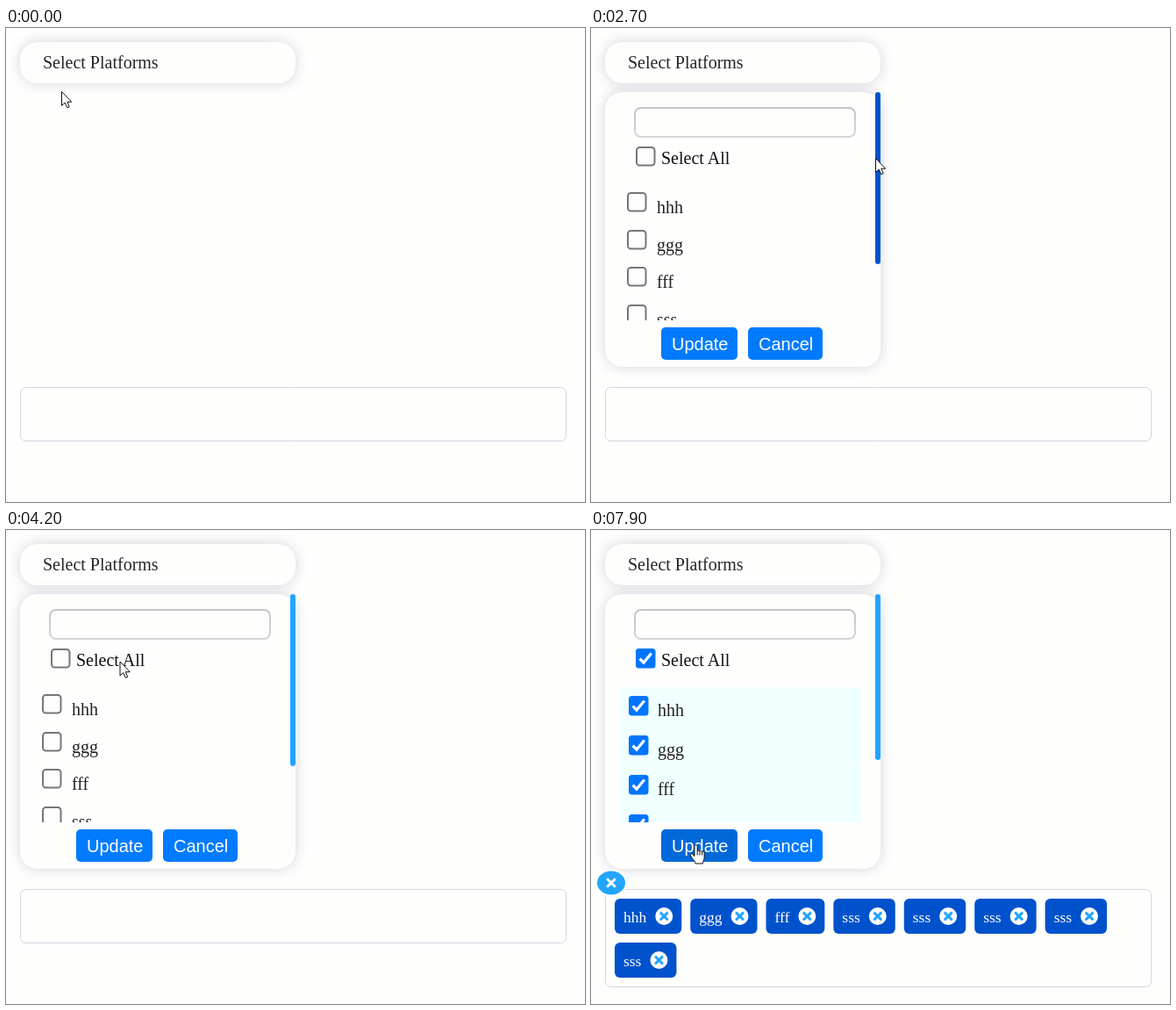
Animation of 660 by 540 pixels, one loop 8000 ms. Source, as an HTML page with a canvas:

```html
<!DOCTYPE html>
<html lang="en">
<head>
<meta charset="utf-8">
<title>Multi-select dropdown</title>
<style>
  html, body { margin: 0; width: 100%; height: 100%; overflow: hidden; background: #fefefd; }
  canvas { display: block; }
</style>
</head>
<body>
<canvas id="stage" width="660" height="540"></canvas>
<script>
const W = 660, H = 540, LOOP = 8000;
const BG = '#fefefd', BLUE = '#007bff', SKY = '#22a5fd', NAVY = '#0052cc';
const SERIF = '"Liberation Serif", "Times New Roman", serif';
const SANS = '"Liberation Sans", Arial, sans-serif';
const ITEMS = ['hhh', 'ggg', 'fff', ...Array(5).fill('sss')];

const OPEN = 800, PRESS = 4930, CHECK = 5100, UPDATE = 7900;
const HEADER = [16, 16, 314, 47], PANEL = [16, 73, 314, 313];
const UPDATE_BTN = [80, 341, 87, 37], CANCEL_BTN = [179, 341, 85, 37];
const LIST_TOP = 179, LIST_H = 154, SCROLL_MAX = 186, BOX = 22.5;

const screen = document.getElementById('stage').getContext('2d');
const layer = document.createElement('canvas');
layer.width = W;
layer.height = H;
const panelCtx = layer.getContext('2d');
for (const ctx of [screen, panelCtx]) ctx.textRendering = 'optimizeLegibility';
let c = screen;

// Pointer moves; it rests in between. "bow" bends the way sideways.
const HOME = { x: 63.5, y: 72.5 };
const MOVES = [
  { from: 230, to: 500, x: 134.5, y: 53.5 },
  { from: 1120, to: 1600, x: 131.5, y: 81.5 },
  { from: 1630, to: 2160, x: 357.5, y: 141.5 },
  { from: 2300, to: 2500, x: 324.5, y: 148.5 },
  { from: 2700, to: 3230, x: 324.5, y: 265 },
  { from: 3400, to: 3600, x: 318.5, y: 218.5 },
  { from: 3600, to: 4200, x: 130, y: 150 },
  { from: 4230, to: 4760, x: 65, y: 147.5 },
  { from: 6560, to: 7360, x: 117.5, y: 336, bow: -30 },
  { from: 7400, to: 7600, x: 118.5, y: 358 }
];

const ARROW = new Path2D('M0 0V16L3.7 12.6L6.3 18.3L8.7 17.3L6.3 11.7H11.2Z');
const HAND = new Path2D('M5.5 13.5V2.3a1.6 1.6 0 0 1 3.2 0V8.2a1.4 1.4 0 0 1 2.8 .3' +
  'a1.4 1.4 0 0 1 2.7 .6a1.3 1.3 0 0 1 2.5 .7V15c0 3-1.7 4-1.7 7H6.5c0-2.5-2.5-4-4-6.5' +
  'L.9 12.6c-.7-1.5 1-2.4 2.2-1.2Z');
const KNUCKLES = new Path2D('M8.7 8.2v4.3M11.5 8.5v4M14.2 9.1v3.4');

const clamp = v => Math.min(1, Math.max(0, v));
const smooth = (t, a, b) => { const u = clamp((t - a) / (b - a)); return u * u * (3 - 2 * u); };
const inside = (p, x, y, w, h) => p.x >= x && p.x < x + w && p.y >= y && p.y < y + h;

// The CSS "ease" curve
function ease(x) {
  let lo = 0, hi = 1, s = .5;
  const bez = (a, b) => 3 * a * s * (1 - s) ** 2 + 3 * b * s * s * (1 - s) + s ** 3;
  for (let i = 0; i < 20; i++) {
    s = (lo + hi) / 2;
    if (bez(.25, .25) < x) lo = s; else hi = s;
  }
  return bez(.1, 1);
}

function pointer(t) {
  let { x, y } = HOME;
  for (const m of MOVES) {
    const u = smooth(t, m.from, m.to);
    x += (m.x - x) * u + (m.bow || 0) * Math.sin(Math.PI * u);
    y += (m.y - y) * u;
  }
  return { x, y };
}

function box(x, y, w, h, r, fill) {
  c.beginPath();
  c.roundRect(x, y, w, h, r);
  c.fillStyle = fill;
  c.fill();
}

function frame(x, y, w, h, r, line, color) {
  c.beginPath();
  c.roundRect(x + line / 2, y + line / 2, w - line, h - line, r);
  c.lineWidth = line;
  c.strokeStyle = color;
  c.stroke();
}

function oval(x, y, rx, ry, fill) {
  c.beginPath();
  c.ellipse(x, y, rx, ry, 0, 0, 7);
  c.fillStyle = fill;
  c.fill();
}

function card(rect) {
  c.save();
  c.shadowColor = 'rgba(50, 50, 100, .2)';
  c.shadowBlur = 15;
  box(...rect, 20, BG);
  c.restore();
}

function text(str, x, y, color = '#111', size = 20, family = SERIF) {
  c.font = size + 'px ' + family;
  c.fillStyle = color;
  c.fillText(str, x, y);
}

function cross(x, y, r, color) {
  c.beginPath();
  c.moveTo(x - r, y - r);
  c.lineTo(x + r, y + r);
  c.moveTo(x + r, y - r);
  c.lineTo(x - r, y + r);
  c.lineWidth = 2.9;
  c.strokeStyle = color;
  c.stroke();
}

function checkbox(x, y, on, hover, active) {
  if (!on) {
    frame(x, y, BOX, BOX, 3.5, 2, active ? '#8d8d8d' : hover ? '#4f4f4f' : '#767676');
    return;
  }
  box(x, y, BOX, BOX, 3.5, hover ? '#005cc8' : '#0075ff');
  c.beginPath();
  c.moveTo(x + 4.6, y + 11.6);
  c.lineTo(x + 9, y + 16.2);
  c.lineTo(x + 17.8, y + 5.4);
  c.lineWidth = 3.2;
  c.strokeStyle = '#fff';
  c.stroke();
}

function button(label, rect, p) {
  box(...rect, 5, inside(p, ...rect) ? '#0069d9' : BLUE);
  text(label, rect[0] + 12, rect[1] + 26, '#fff', 20, SANS);
}

function list(on, scroll, p) {
  const pitch = on ? 45 : 42.7, x = on ? 43 : 41;
  c.save();
  c.beginPath();
  c.rect(16, LIST_TOP, 308, LIST_H);
  c.clip();
  ITEMS.forEach((name, i) => {
    const y = LIST_TOP + i * pitch - scroll;
    if (on) box(32, y, 276, pitch, 4, '#f0ffff');
    const top = Math.round(y + (on ? 10 : 8));
    checkbox(x, top, on, inside(p, x, top, BOX, BOX));
    text(name, on ? 76 : 75, Math.round(y + (on ? 33 : 32)), '#222');
  });
  c.restore();
}

function panel(t, p) {
  const on = t >= CHECK, grabbed = t >= 2440 && t < 3620;
  const pos = smooth(t, 2700, 3230) - smooth(t, 3620, 4020);
  card(PANEL);

  const edge = c.createLinearGradient(0, 90, 0, 125);
  edge.addColorStop(0, '#c4c4c4');
  edge.addColorStop(1, '#d6d6d6');
  frame(49, 90, 253, 35, 7, 2, edge);

  checkbox(51, 135, on, inside(p, 51, 135, BOX, BOX), t >= PRESS);
  text('Select All', 80, 155);
  list(on, pos * SCROLL_MAX, p);
  button('Update', UPDATE_BTN, p);
  button('Cancel', CANCEL_BTN, p);
  box(324, 73 + pos * 117, 6, on ? 189 : 196, 3, grabbed ? NAVY : SKY);
}

function chips() {
  let x = 27, y = 420;
  for (const name of ITEMS) {
    c.font = '17.5px ' + SERIF;
    const w = c.measureText(name).width + 50;
    if (x + w > 628) {
      x = 27;
      y += 50;
    }
    box(x, y, w, 40, 6, NAVY);
    text(name, x + 10, y + 27, '#fff', 17.5);
    oval(x + w - 20, y + 20, 10, 10, '#fff');
    cross(x + w - 20, y + 20, 4.4, SKY);
    x += w + 10;
  }
}

function clearBadge() {
  oval(23, 402, 18.5, 15.5, '#fff');
  oval(23, 402, 16, 13.5, SKY);
  cross(23, 402, 4.8, '#fff');
}

function drawPointer(p) {
  const hand = [HEADER, UPDATE_BTN, CANCEL_BTN].some(r => inside(p, ...r));
  const shape = hand ? HAND : ARROW;
  c.save();
  c.translate(hand ? p.x - 6 : p.x, p.y);
  c.lineWidth = 1;
  c.fillStyle = '#fff';
  c.strokeStyle = '#111';
  c.fill(shape);
  c.stroke(shape);
  if (hand) c.stroke(KNUCKLES);
  c.restore();
}

function draw(t) {
  const p = pointer(t), done = t >= UPDATE;
  c = screen;
  c.fillStyle = BG;
  c.fillRect(0, 0, W, H);
  card(HEADER);
  text('Select Platforms', 42, 46, '#26262a');
  frame(16, 409, 623, done ? 112 : 62, 6, 1, '#d5d5de');

  if (t >= OPEN) {
    const k = ease(clamp((t - OPEN) / 400));
    c = panelCtx;
    c.clearRect(0, 0, W, H);
    panel(t, p);
    c = screen;
    c.globalAlpha = k;
    c.drawImage(layer, 0, Math.round(-64 * (1 - k)));
    c.globalAlpha = 1;
  }
  if (done) {
    chips();
    clearBadge();
  }
  drawPointer(p);
}

const start = performance.now();
function tick() {
  draw((performance.now() - start) % LOOP);
  requestAnimationFrame(tick);
}
tick();
</script>
</body>
</html>
```
